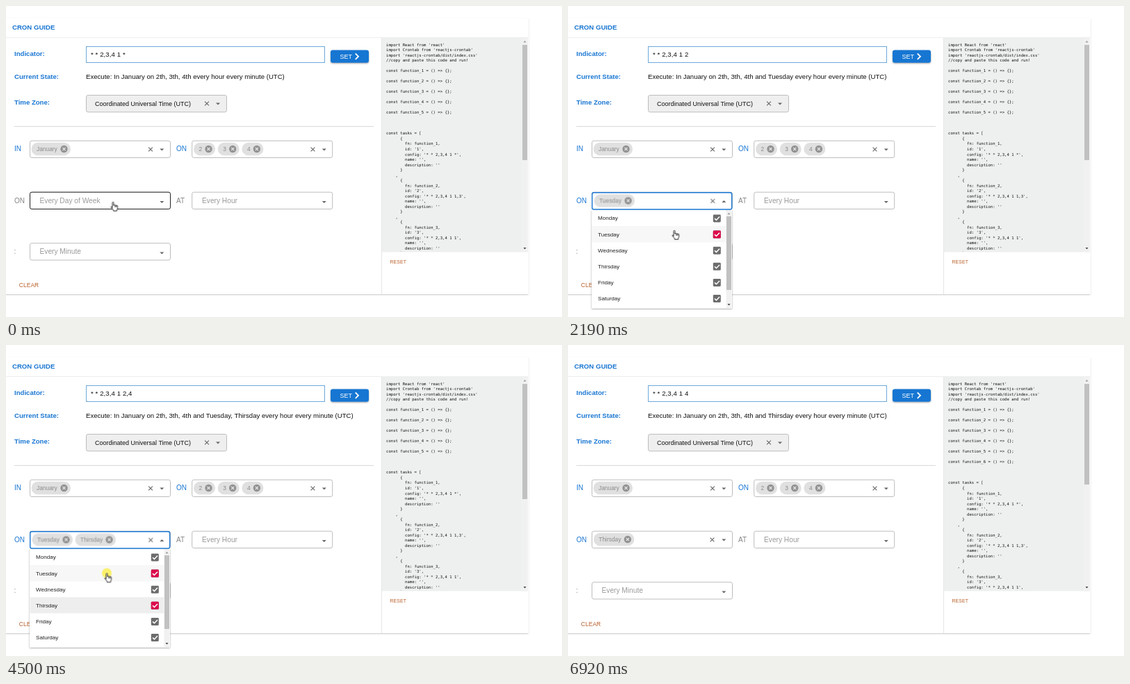
Recreate the animation shown at these times as an HTML page. Size 800 by 448 pixels, loop 7240 ms.

```html
<!DOCTYPE html>
<html lang="en">
<head>
<meta charset="utf-8">
<title>Cron guide</title>
<style>
  html, body { margin: 0; width: 100%; height: 100%; overflow: hidden; background: #fff; }
  svg { display: block; width: 800px; height: 448px; }
  text { font: 9.6px "Liberation Sans", Arial, sans-serif; fill: #111; white-space: pre; }
  .title { font-weight: bold; fill: #1976d2; }
  .label { font-size: 10px; fill: #1976d2; }
  .off { fill: #858585; }
  .hint { font-size: 10.2px; fill: #999; }
  .entry { letter-spacing: .09px; }
  .chip { font-size: 8.4px; fill: #8a8a8a; }
  .row { font-size: 8.1px; fill: #222; }
  .link { font-size: 8.4px; letter-spacing: .1px; fill: #b9602a; }
  .code { font: 5.62px "DejaVu Sans Mono", monospace; }
  .box { fill: #fff; stroke: #bdbdbd; }
  .cross { fill: none; stroke: #666; stroke-width: 1.1; }
  .caret { fill: #666; }
  .mark { fill: none; stroke: #fff; stroke-width: 1.5; }
  .pointer { fill: #fff; stroke: #111; stroke-width: .9; stroke-linejoin: round; }
</style>
</head>
<body>
<svg id="stage" viewBox="0 0 800 448"></svg>
<script>
const LOOP = 7240, OPEN = 1060, CLOSE = 5660, SAVED = 5740;
const stage = document.getElementById('stage');

// Drawing helpers
const text = (x, y, s, cls = '') => `<text x="${x}" y="${y}" class="${cls}">${s}</text>`;
const rect = (x, y, w, h, attrs) => `<rect x="${x}" y="${y}" width="${w}" height="${h}" ${attrs}/>`;
const on = (span, body) => `<g data-on="${span}">${body}</g>`;
const caret = (x, y, up) => `<path class="caret" d="M${x - 3} ${up ? y + 1.5 : y - 1.5}h6l-3 ${up ? -3 : 3}z"/>`;
const cross = (x, y, r = 2.9) => `<path class="cross" d="M${x - r} ${y - r}l${2 * r} ${2 * r}m0 ${-2 * r}l${-2 * r} ${2 * r}"/>`;
const field = (x, y, attrs = '') => rect(x, y, 202, 24.3, `rx="2.6" class="box" ${attrs}`);
const chip = (x, y, w, s) => rect(x, y - 9.2, w, 18.4, 'rx="9.2" fill="#e0e0e0"')
  + text(x + 7.5, y + 3, s, 'chip')
  + `<circle cx="${x + w - 9.5}" cy="${y}" r="5.2" fill="#929292"/>`
  + `<g style="--c:#e0e0e0"><path d="M${x + w - 11.5} ${y - 2}l4 4m0 -4l-4 4" stroke="#e6e6e6" stroke-width="1.1"/></g>`;
const tick = (y, color) => rect(208.8, y - 5.5, 11, 11, `rx="1.4" fill="${color}"`)
  + `<path class="mark" d="M211 ${y}l2.4 2.4 4.6-4.8"/>`;

// Menu
const days = ['Monday', 'Tuesday', 'Wednesday', 'Thirsday', 'Friday', 'Saturday'];
const TOP = 294, PITCH = 23.1;
const picked = { Tuesday: '2190-4570', Thirsday: '3270-7240' };
const rowTop = i => TOP + PITCH * i;
const eachPicked = draw => days.map((d, i) => picked[d] ? on(picked[d], draw(i)) : '').join('');
const menu = () => `<g filter="url(#lift)">${rect(34, 293.5, 202, 142, 'fill="#fff"')}</g>`
  + eachPicked(i => rect(34.5, rowTop(i), 193, PITCH, 'fill="#eee"'))
  + rect(34.5, 0, 193, PITCH, 'id="hover" fill="#f7f7f7"')
  + days.map((d, i) => text(43, rowTop(i) + 14.4, d, 'row') + tick(rowTop(i) + 12, '#6c6c6c')).join('')
  + eachPicked(i => tick(rowTop(i) + 12, '#dc0a4b'))
  + rect(227.5, 294, 8, 141, 'fill="#f1f1f1"') + rect(228, 303, 7, 106, 'fill="#c1c1c1"')
  + '<path d="M229.5 300.2h4l-2-2.4z" fill="#999"/><path d="M229.5 429h4l-2 2.4z" fill="#444"/>';

// Generated code panel
const task = (i, cron) => ['      {', `        fn: function_${i},`, `        id: '${i}',`,
  `        config: '${cron}',`, "        name: '',", "        description: ''", '      }', '    ,'];
const listing = count => [
  "import React from 'react'", "import Crontab from 'reactjs-crontab'",
  "import 'reactjs-crontab/dist/index.css'", '//copy and paste this code and run!', '',
  ...Array.from({ length: count }, (_, i) => [`const function_${i + 1} = () =&gt; {};`, '']).flat(),
  '', '', 'const tasks = [',
  ...['*', '1,3', '1'].flatMap((d, i) => task(i + 1, `* * 2,3,4 1 ${d}`)),
].map((s, i) => text(547, 57.6 + 7.52 * i, s, 'code')).join('');
const panel = (span, count, thumb) => on(span, listing(count) + rect(743, 56, 7, thumb, 'fill="#c1c1c1"'));

// The values that change with each selection
const phases = [
  ['0-2190', '*', []], ['2190-3270', '2', ['Tuesday']],
  ['3270-4570', '2,4', ['Tuesday', 'Thirsday']], ['4570-7240', '4', ['Thirsday']],
];
const readout = ([span, cron, list]) => on(span, text(122, 73, `* * 2,3,4 1 ${cron}`, 'entry')
  + text(115, 105.3, `Execute: In January on 2th, 3th, 4th ${list.length ? `and ${list.join(', ')} ` : ''}every hour every minute (UTC)`));
const choice = ([span, , list]) => on(span, list.length
  ? list.map((d, i) => chip(36.8 + 62 * i, 280, 58.5, d)).join('') + cross(207.5, 280.5)
  : text(48.5, 283.5, 'Every Day of Week', 'hint'));

stage.innerHTML = `
  <defs>
    <filter id="lift" x="-10%" y="-10%" width="120%" height="125%">
      <feDropShadow dx="0" dy="1" stdDeviation="1.2" flood-opacity=".38"/>
    </filter>
    <clipPath id="pane">${rect(541, 46, 210, 308, '')}</clipPath>
  </defs>
  <g filter="url(#lift)" opacity=".6">${rect(-10, 17.5, 761.5, 397.5, 'fill="#fff"')}</g>
  ${rect(0, 17.5, 751.5, 397.5, 'fill="#fff"')}
  ${rect(0, 45, 751.5, 1, 'fill="#eee"')}
  ${rect(540, 46, 1, 369, 'fill="#e6e6e6"')}
  ${rect(12, 173, 517, 1, 'fill="#d8d8d8"')}
  ${text(9, 34, 'CRON GUIDE', 'title')}
  ${text(12, 72, 'Indicator:', 'title')}
  ${text(12, 105.3, 'Current State:', 'title')}
  ${text(12, 142, 'Time Zone:', 'title')}
  ${rect(115.5, 58.5, 343, 23, 'fill="#fff" stroke="#6ea9dc"')}
  ${phases.map(readout).join('')}
  <g filter="url(#lift)">${rect(467, 63.5, 55, 18.3, 'rx="3" fill="#1976d2"')}</g>
  ${on('5520-5820', rect(467, 63.5, 55, 18.3, 'rx="3" fill="#1560b8" filter="url(#lift)"'))}
  <text x="480.5" y="76" style="font-size:9px;fill:#fff">SET</text>
  <path class="mark" style="stroke-width:1.8" d="M502.8 68.5l4.2 4.2-4.2 4.2"/>

  ${field(115.5, 128.5, 'style="fill:#efefef"')}
  <text x="128" y="143.6" style="font-size:9px">Coordinated Universal Time (UTC)</text>
  ${cross(289, 140.5)}${caret(305, 141)}

  ${text(12, 209.3, 'IN', 'label')}${field(34.5, 194.2)}
  ${chip(36.5, 206, 56.5, 'January')}${cross(208, 206.5)}${caret(224.3, 207)}
  ${text(245, 209.3, 'ON', 'label')}${field(267.7, 194.2)}
  ${[2, 3, 4].map((n, i) => chip(270 + 34.7 * i, 206, 31, n)).join('')}${cross(441.5, 206.5)}${caret(457.8, 207)}

  ${on('0-1060', text(12, 283.5, 'ON', 'label off'))}
  ${on('1060-2190', text(12, 283.5, 'ON'))}
  ${on('2190-7240', text(12, 283.5, 'ON', 'label'))}
  ${field(34.5, 268.2)}
  ${on('0-1060', field(34.5, 268.2, 'style="stroke:#222"') + caret(224.3, 282.5))}
  ${on('5660-7240', caret(224.3, 281))}
  ${text(245, 283.5, 'AT', 'label off')}${field(267.7, 268.2)}
  ${text(282, 283.5, 'Every Hour', 'hint')}${caret(457.8, 282.5)}

  ${text(11.5, 357, ':', 'label off')}${field(34.5, 341.7)}
  ${text(48.5, 357, 'Every Minute', 'hint')}${caret(224.3, 356)}
  ${text(18.8, 405, 'CLEAR', 'link')}

  ${rect(541, 46, 210, 308.5, 'fill="#eef0f0"')}
  ${rect(742, 46, 9, 308.5, 'fill="#f1f1f1"')}
  <path d="M744.5 52.5h4l-2-2.4z" fill="#999"/><path d="M744.5 348h4l-2 2.4z" fill="#444"/>
  <g clip-path="url(#pane)">${panel('0-5740', 5, 166)}${panel('5740-7240', 6, 145)}</g>
  <text x="552.5" y="370.6" class="link" style="font-size:6.9px">RESET</text>

  ${on(`${OPEN}-${CLOSE}`, menu() + rect(34.7, 268.7, 201, 24.3, 'rx="2.6" fill="#fff" stroke="#1976d2" stroke-width="1.4"') + caret(224.3, 281.5, true))}
  <g id="value">${phases.map(choice).join('')}</g>

  <g id="cursor">
    ${on('1060-1210,2120-2190,3190-3270,4500-4570,5660-5740', '<circle r="7" fill="#fbef55" opacity=".85"/>')}
    <path id="hand" class="pointer" transform="translate(-3.6 0)" d="M2.6 8.6V1.4a1 1 0 0 1 2 0V5.4a.9.9 0 0 1 1.9.2 .9.9 0 0 1 1.9.3 .9.9 0 0 1 1.8.6V9.8L9.2 11.5V13.2H4V11.8L.9 8.2C.2 7 1.5 6.3 2.6 8.6ZM6.5 5.6V7.8M8.4 5.9V7.9"/>
    <path id="arrow" class="pointer" d="M0 0V10.5L2.5 8.2 4.2 12 5.7 11.3 4.1 7.7H7.5Z"/>
  </g>`;

// Pointer path: held positions, reached in n equal time steps
const smooth = k => k * k * (3 - 2 * k), linear = k => k;
const path = [[0, 154, 282]];
function glide(t0, t1, n, x, y, ease = smooth) {
  const [, x0, y0] = path.at(-1);
  for (let i = 1; i <= n; i++) {
    const e = ease(i / n);
    path.push([t0 + (t1 - t0) * (i - 1) / (n - 1), x0 + (x - x0) * e, y0 + (y - y0) * e]);
  }
}
glide(130, 270, 3, 158, 283);
glide(1370, 1960, 9, 153, 323);
glide(2270, 2810, 8, 146, 359);
glide(2890, 3040, 3, 144.5, 365.5, linear);
glide(3500, 4190, 10, 145, 331);
path.push([4270, 145, 328.5]);
glide(4740, 5430, 10, 491, 80);
path.push([5520, 494, 73.5]);
glide(5820, 6230, 6, 617, 283, k => k ** 1.5);
glide(6300, 6920, 9, 806, 452, linear);

// Stepped CSS keyframes from [ms, declarations] pairs
let css = '', serial = 0;
function animate(el, frames) {
  const name = `k${serial++}`;
  css += `@keyframes ${name}{${frames.map(([t, d]) => `${(t / LOOP * 100).toFixed(4)}%{${d}}`).join('')}}\n`;
  el.style.animation = `${name} ${LOOP}ms step-end infinite`;
}
const shown = yes => `opacity:${+yes}`;
const byId = id => document.getElementById(id);
const move = (x, y) => `transform:translate(${x.toFixed(2)}px,${y.toFixed(2)}px)`;

for (const el of stage.querySelectorAll('[data-on]')) {
  const frames = [[0, shown(false)]];
  for (const span of el.dataset.on.split(',')) {
    const [a, b] = span.split('-').map(Number);
    frames.push([a, shown(true)]);
    if (b < LOOP) frames.push([b, shown(false)]);
  }
  animate(el, frames);
}
const overMenu = (x, y) => x > 34 && x < 228 && y >= TOP;
const clickable = (t, x, y) => (t < CLOSE && x < 237 && y > 268) || (x > 467 && x < 522 && y > 63 && y < 79);
animate(byId('cursor'), path.map(([t, x, y]) => [t, move(x, y)]));
animate(byId('hand'), path.map(([t, x, y]) => [t, shown(clickable(t, x, y))]));
animate(byId('arrow'), path.map(([t, x, y]) => [t, shown(!clickable(t, x, y))]));
animate(byId('hover'), path.map(([t, x, y]) =>
  [t, `${shown(overMenu(x, y))};${move(0, rowTop(Math.max(0, Math.floor((y - TOP) / PITCH))))}`]));
animate(byId('value'), [[0, move(0, 0)], [OPEN, move(.7, .4)], [CLOSE, move(0, 0)]]);

document.head.appendChild(document.createElement('style')).textContent = css;
</script>
</body>
</html>
```
